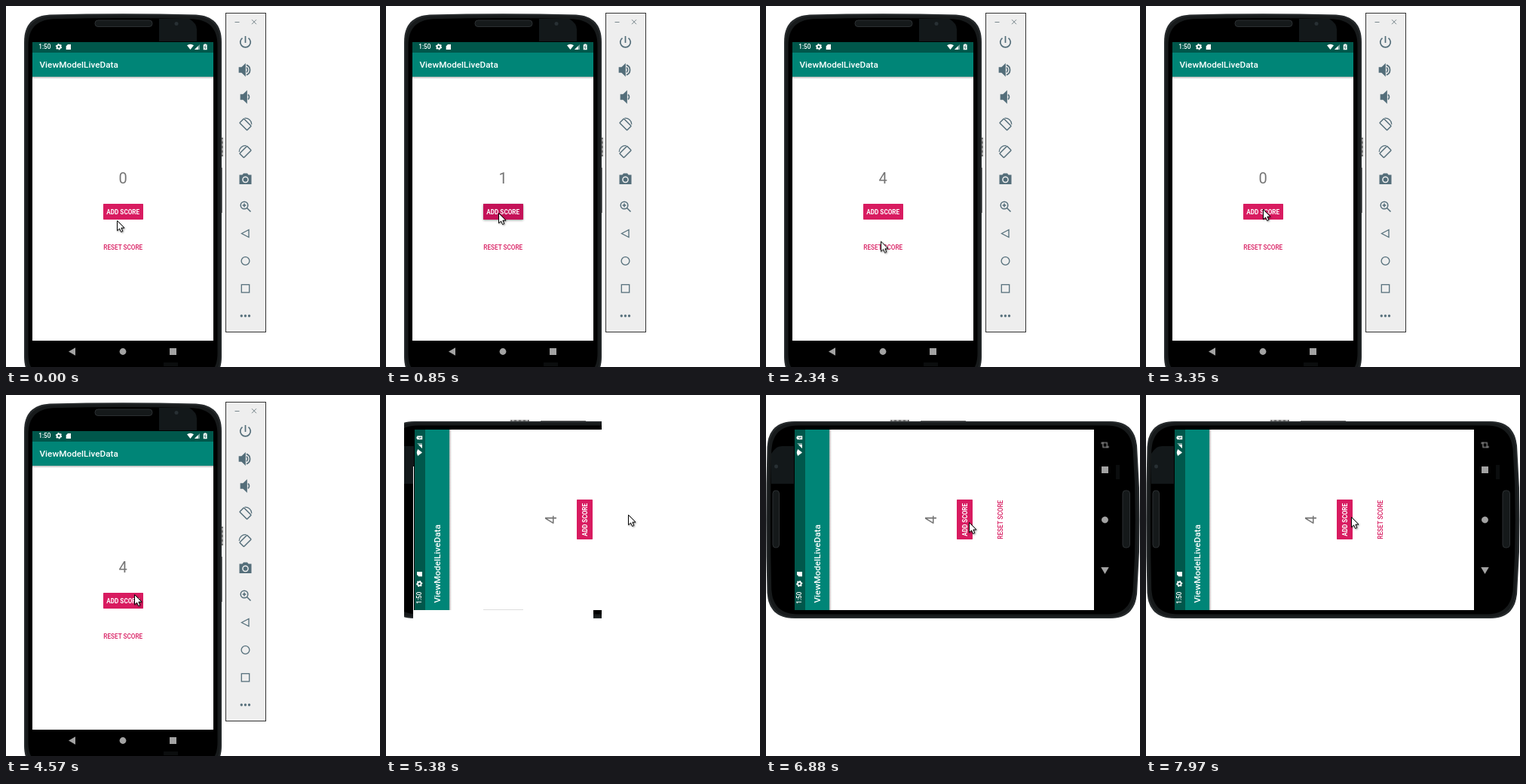
An HTML page that plays this animation: 496 by 480 pixels, repeating every 8 s.

```html
<!DOCTYPE html>
<html lang="en">
<head>
<meta charset="utf-8">
<title>Score counter in a phone emulator</title>
<style>
  html, body { margin: 0; width: 100%; height: 100%; overflow: hidden; background: #fff; }
  svg { display: block; width: 496px; height: 480px; }
  text { font-family: Roboto, "Open Sans", sans-serif; font-weight: 500; }
  .mid { text-anchor: middle; }

  .phone, .tools, .cover, .score, .press, .ripple, .hint, .cursor { animation: 8s linear infinite; }
  .phone { animation-name: turn; animation-timing-function: step-end; }
  .tools { animation-name: tools; animation-timing-function: step-end; }
  .cover { animation-name: cover; animation-timing-function: step-end; }
  .score { animation-name: score; animation-timing-function: step-end; }
  .score text { font-weight: 400; }
  .press { animation-name: press; filter: drop-shadow(0 1px 1.5px rgba(0, 0, 0, .5)); }
  .ripple { animation-name: ripple; }
  .hint { animation-name: hint; }
  .cursor { animation-name: cursor; filter: drop-shadow(1.5px 1.5px 1px rgba(0, 0, 0, .4)); }

  @keyframes turn {
    0% { transform: none; }
    67.25%, 100% { transform: matrix(0, -1, 1, 0, -10, 321); }
  }
  @keyframes tools {
    0% { opacity: 1; }
    66.125%, 100% { opacity: 0; }
  }
  @keyframes cover {
    0% { opacity: 0; }
    67.25% { opacity: 1; }
    67.625%, 100% { opacity: 0; }
  }
  /* each digit sits 40px below the previous one */
  @keyframes score {
    0% { transform: translateY(0); }
    9.875% { transform: translateY(-40px); }
    14% { transform: translateY(-80px); }
    17.75% { transform: translateY(-120px); }
    21.5% { transform: translateY(-160px); }
    35.75% { transform: translateY(0); }
    45.5% { transform: translateY(-40px); }
    48.5% { transform: translateY(-80px); }
    51% { transform: translateY(-120px); }
    53.5%, 100% { transform: translateY(-160px); }
  }
  @keyframes press {
    0%, 6.62% { opacity: 0; }
    6.625%, 9.5% { opacity: .5; }
    9.875%, 14%, 17.75%, 19%, 21.5% { opacity: 1; }
    12.5%, 16.5%, 20.5% { opacity: .3; }
    24.5%, 44.75% { opacity: 0; }
    45.5%, 48.5%, 51%, 53.5% { opacity: 1; }
    47.5%, 50%, 52.5% { opacity: .3; }
    56%, 100% { opacity: 0; }
  }
  @keyframes ripple {
    0%, 35.3% { opacity: 0; }
    36%, 37% { opacity: .14; }
    40.5%, 100% { opacity: 0; }
  }
  @keyframes hint {
    0%, 71.74% { opacity: 0; transform: rotate(-90deg); }
    73%, 91.75% { opacity: 1; transform: rotate(-90deg); animation-timing-function: cubic-bezier(.408, 1.181, .674, 1.08); }
    79.5%, 90.49% { opacity: 1; transform: none; }
    90.5% { opacity: 0; transform: rotate(-90deg); }
    98.25%, 100% { opacity: 1; transform: none; }
  }
  @keyframes cursor {
    0%, .375% { transform: translate(147px, 285px); }
    3.75%, 25% { transform: translate(149px, 275px); animation-timing-function: ease-in-out; }
    29.625% { transform: translate(152px, 313px); }
    30.4%, 36.5% { transform: translate(154px, 318px); animation-timing-function: ease-in-out; }
    41.5%, 54.5% { transform: translate(155px, 270px); }
    57.125% { transform: translate(170px, 265px); animation-timing-function: ease-in-out; }
    62.5% { transform: translate(316px, 144px); }
    64.5%, 76.3% { transform: translate(321px, 159px); animation-timing-function: ease-in-out; }
    80% { transform: translate(230px, 168px); }
    81.625%, 83.5% { transform: translate(255px, 168px); }
    86%, 90.5% { transform: translate(269px, 169px); }
    95% { transform: translate(262px, 169px); }
    99.6%, 100% { transform: translate(272px, 162px); }
  }
</style>
</head>
<body>
<svg viewBox="0 0 496 480">
  <defs>
    <clipPath id="scoreWindow"><rect x="140" y="215" width="30" height="26"/></clipPath>
    <linearGradient id="fade" x2="0" y2="1">
      <stop stop-opacity=".3"/><stop offset="1" stop-opacity="0"/>
    </linearGradient>
    <pattern id="ridges" width="4" height="6" patternUnits="userSpaceOnUse">
      <rect width="4" height="6" fill="#aaa"/><rect width="4" height="3" fill="#777"/>
    </pattern>
    <path id="body" d="M24 48C24 24 36 13 58 11.5Q155 9 252 11.5C274 13 286 24 286 48V466C286 488 276 499 254 502Q155 509 56 502C34 499 24 488 24 466Z"/>
    <path id="speaker" d="M-6-3h3.2L1.5-7V7L-2.8 3H-6Z" fill="#546e7a"/>
    <g id="tilt" fill="none" stroke="#546e7a" stroke-width="1.5">
      <rect x="-4" y="-7" width="8" height="14" rx="1" transform="rotate(-45)"/>
      <path d="M-1-8.3A8.3 8.3 0 0 1 8.3 0" stroke-width="1.2"/>
    </g>
  </defs>

  <rect width="496" height="480" fill="#fff"/>

  <g class="phone">
    <!-- body -->
    <rect x="285" y="175" width="3" height="25" fill="url(#ridges)"/>
    <rect x="285" y="215" width="2" height="60" fill="#777"/>
    <use href="#body" fill="#25292b"/>
    <use href="#body" transform="translate(155 257.5) scale(.985 .992) translate(-155 -257.5)" fill="#171a1b"/>
    <use href="#body" transform="translate(155 257.5) scale(.958 .977) translate(-155 -257.5)"/>
    <path d="M203 17h40q10 6 10 14v16h-50Z" fill="#13181a"/>
    <path d="M209 474h19v5h-19Z" fill="#0b0d0e"/>
    <g fill="#15191a" stroke="#2c3032">
      <rect x="118" y="19" width="76" height="8.5" rx="4"/>
      <rect x="118" y="483" width="76" height="9.5" rx="4"/>
    </g>
    <circle cx="226" cy="23.5" r="2.5" fill="#283034"/>

    <!-- app -->
    <rect x="35" y="48" width="240" height="397" fill="#fff"/>
    <rect x="35" y="94" width="240" height="3" fill="url(#fade)"/>
    <rect x="35" y="48" width="240" height="14" fill="#00574b"/>
    <rect x="35" y="62" width="240" height="32" fill="#008577"/>
    <g fill="#fff">
      <text x="43.3" y="57.2" font-size="8.2">1:50</text>
      <text x="44.5" y="82" font-size="11.75">ViewModelLiveData</text>
      <circle cx="70" cy="54.3" r="2.4" fill="none" stroke="#fff" stroke-width="1.8"/>
      <circle cx="70" cy="54.3" r="3.6" fill="none" stroke="#fff" stroke-width="1.2" stroke-dasharray="1.9 1.87"/>
      <path d="M82 51h4v7h-6.3v-4.6Z"/>
      <path d="M240 52.3q4.5-3 9 0L244.5 58Z"/>
      <path d="M257 51v7h-7Z" opacity=".45"/>
      <path d="M254.7 53.3V58H250Z"/>
      <path d="M263 50.4h2.4v.9h1.2v7h-4.8v-7h1.2Z"/>
    </g>
    <path d="M264.8 52.5l-1.5 2.6h1.7l-1.2 2.2" fill="none" stroke="#00574b" stroke-width=".8"/>

    <g clip-path="url(#scoreWindow)">
      <g class="score mid" fill="#757575" font-size="20">
        <text x="155" y="235.6">0</text>
        <text x="155" y="275.6">1</text>
        <text x="155" y="315.6">2</text>
        <text x="155" y="355.6">3</text>
        <text x="155" y="395.6">4</text>
      </g>
    </g>

    <rect x="129" y="263" width="53" height="21" rx="1" fill="#d81b60" style="filter:drop-shadow(0 .8px .7px rgba(0,0,0,.4))"/>
    <rect class="press" x="129" y="263" width="53" height="21" rx="1" fill="#c01056"/>
    <text class="mid" x="155.2" y="276.7" font-size="8.17" fill="#fff" style="font-weight:700">ADD SCORE</text>
    <rect class="ripple" x="124" y="310" width="62" height="21" rx="1"/>
    <text class="mid" x="155.2" y="323.5" font-size="8.2" fill="#d81b60">RESET SCORE</text>

    <!-- navigation bar -->
    <g fill="#a3a3a3">
      <path d="M83 459.5l9-5.2v10.4Z"/>
      <circle cx="155" cy="459.5" r="4.4"/>
      <rect x="217" y="455" width="9" height="9"/>
    </g>
    <g transform="translate(254.5 459.5) rotate(90)">
      <g class="hint" fill="none" stroke="#a3a3a3" stroke-width="1.1">
        <rect x="-2.6" y="-3" width="5.4" height="6"/>
        <path d="M-4.4-1.5V-3H-2M4.6 1.5V3H2.2"/>
      </g>
    </g>
  </g>

  <!-- half-drawn window while the device turns -->
  <g class="cover" fill="#fff">
    <path fill-rule="evenodd" d="M0 0H496V480H0ZM24 32V297H286V32Z"/>
    <rect x="36" y="286" width="239" height="12"/>
    <rect x="36" y="95" width="1" height="191"/>
    <rect x="129" y="285" width="53" height="1" fill="#ddd"/>
  </g>

  <!-- emulator toolbar -->
  <g class="tools">
    <rect x="291.5" y="9.5" width="53" height="424" fill="#eee" stroke="#333"/>
    <path d="M303.5 21.5h6M326 18.2l6 6m0-6l-6 6" stroke="#78868c" fill="none"/>
    <g fill="none" stroke="#546e7a" stroke-width="1.7">
      <path transform="translate(317.5 48)" d="M0-8V1M-4-5.4a6.8 6.8 0 1 0 8 0"/>
      <g transform="translate(315.5 85)">
        <use href="#speaker"/>
        <path d="M3.4-3.2a4 4 0 0 1 0 6.4M3.4-6.6a7 7 0 0 1 0 13.2"/>
      </g>
      <g transform="translate(317.5 121)">
        <use href="#speaker"/>
        <path d="M3.4-3.2a4 4 0 0 1 0 6.4"/>
      </g>
      <use href="#tilt" transform="translate(317.5 157.5)"/>
      <use href="#tilt" transform="translate(317.5 194) scale(-1 1)"/>
      <g transform="translate(317.5 230)">
        <path d="M-2.5-7.5h5L4-5.5H8V7H-8V-5.5h4Z" fill="#546e7a" stroke="none"/>
        <circle cy=".8" r="3.6" stroke="#eee" stroke-width="1.5"/>
      </g>
      <g transform="translate(316 265)" stroke-width="1.5">
        <circle r="4.8"/>
        <path d="M3.5 3.5l5 5M-2.4 0h4.8M0-2.4v4.8"/>
      </g>
      <g stroke-width="1.3">
        <path d="M312.5 302.5l9.5-5v10Z"/>
        <circle cx="317.5" cy="339" r="5.4"/>
        <rect x="312.3" y="370.5" width="10.4" height="10.4"/>
      </g>
    </g>
    <g fill="#546e7a">
      <circle cx="312.3" cy="412" r="1.7"/><circle cx="317.4" cy="412" r="1.7"/><circle cx="322.5" cy="412" r="1.7"/>
    </g>
  </g>

  <path class="cursor" d="M.5.5V13.8L3.6 11 5.6 15.5 7.8 14.5 5.9 10.1H10Z" fill="#fff" stroke="#000"/>
</svg>
</body>
</html>
```
